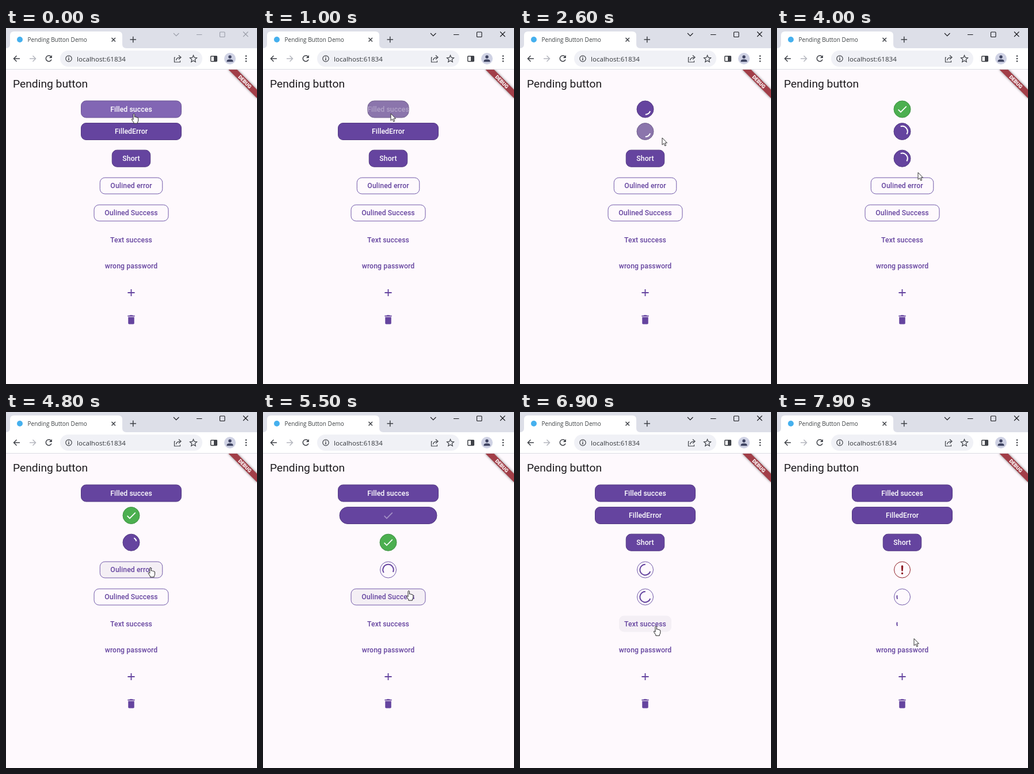
Recreate the animation shown at these times as an HTML page. Size 436 px wide and 616 px high, loop 8000 ms.

```html
<!DOCTYPE html>
<html lang="en">
<head>
<meta charset="utf-8">
<title>Pending Button Demo</title>
<style>
  html, body { margin: 0; width: 100%; height: 100%; overflow: hidden; background: #fef9fd; }
  svg { display: block; width: 436px; height: 616px; }
  .ui { font-family: "Open Sans", "Noto Sans", sans-serif; }
  .app { font-family: Roboto, sans-serif; }
  .label { font: 500 12.25px Roboto, sans-serif; letter-spacing: .09px; text-anchor: middle; }
  .line { fill: none; stroke: #3f4248; stroke-width: 1.5; }
</style>
</head>
<body>
<svg id="stage" viewBox="0 0 436 616">
  <defs>
    <filter id="blur" x="-20%" y="-60%" width="140%" height="220%"><feGaussianBlur stdDeviation="2"/></filter>
    <clipPath id="page"><rect y="72" width="436" height="544"/></clipPath>
  </defs>
  <rect width="436" height="616" fill="#fef9fd"/>

  <!-- browser window -->
  <rect width="436" height="36" fill="#dddfe8"/>
  <path d="M0 35q7 0 7-7V13q0-7 7-7H195q7 0 7 7v15q0 7 7 7H436V72H0z" fill="#fff"/>
  <rect y="71" width="436" height="1" fill="#dcdde4"/>
  <circle cx="24" cy="20" r="5" fill="#45b0ee"/>
  <text class="ui" x="37.5" y="23.7" font-size="10" fill="#3c4043">Pending Button Demo</text>
  <path class="line" d="M183.500 17l6.500 6.500m0-6.500l-6.500 6.500M215.500 20h10.500m-5.250-5.250v10.500"/>
  <g id="controls" fill="none" stroke-width="1.100">
    <path d="M291 9l4.700 4.700L300.400 9M331 11.500h9.500M412 6.500l8.500 8.500m0-8.500l-8.500 8.500"/>
    <rect x="371.500" y="7" width="8.500" height="8.500" rx="1"/>
  </g>
  <rect x="94" y="39" width="247" height="28" rx="14" fill="#f0f1f6"/>
  <path class="line" d="M24 53H13.500m5-5l-5 5l5 5"/>
  <path class="line" d="M41 53h10.500m-5-5l5 5l-5 5" style="stroke:#b5b7bf"/>
  <path class="line" d="M78.500 50A5 5 0 1 0 79 54.500"/>
  <path d="M79.800 47v5h-5z" fill="#3f4248"/>
  <circle class="line" cx="109" cy="53" r="5.200" style="stroke-width:1.200"/>
  <path class="line" d="M109 52v4M109 49.700v1.300"/>
  <text class="ui" x="123" y="57.500" font-size="11.600" fill="#33363b">localhost:61834</text>
  <path class="line" d="M294 51h-1.500v8h10v-2.500M295.500 56q.5-5 7-5.200M300 47.300l4 3.500l-4 3.500" style="stroke-width:1.200"/>
  <path class="line" d="M325.500 47.200l1.700 4l4.300.4l-3.250 2.850l1 4.200l-3.750-2.250l-3.750 2.250l1-4.200l-3.250-2.850l4.300-.4z" style="stroke-width:1.200"/>
  <rect class="line" x="355.700" y="48.700" width="10.600" height="9" rx="1"/>
  <rect x="361" y="48.500" width="5.500" height="9.500" fill="#3f4248"/>
  <circle cx="389" cy="53" r="10" fill="#cfd2e4"/>
  <circle cx="389" cy="50" r="2.700" fill="#3d4260"/>
  <path d="M383.500 58.500v-1.200q0-3 5.500-3t5.500 3v1.200z" fill="#3d4260"/>
  <g fill="#3f4248"><circle cx="417" cy="48.500" r="1.300"/><circle cx="417" cy="53" r="1.300"/><circle cx="417" cy="57.500" r="1.300"/></g>

  <!-- page -->
  <text class="app" x="12" y="103" font-size="19.250" fill="#1d1b1e">Pending button</text>
  <g clip-path="url(#page)">
    <g transform="translate(436 72) rotate(45)">
      <rect x="-35" y="24.500" width="70" height="10.500" fill="#000" opacity=".5" filter="url(#blur)"/>
      <rect x="-35" y="24.500" width="70" height="10.500" fill="#a23e48"/>
      <text class="app" y="32.900" font-size="8.900" font-weight="900" text-anchor="middle" fill="#fff">DEBUG</text>
    </g>
  </g>
  <g id="buttons"></g>
  <g fill="#65449f">
    <path d="M211.400 457.100h12.200v1.800h-12.200zM216.600 451.900h1.800v12.200h-1.800z"/>
    <path transform="translate(207 494) scale(.875)" d="M6 19c0 1.100.9 2 2 2h8c1.100 0 2-.9 2-2V7H6zM19 4h-3.500l-1-1h-5l-1 1H5v2h14z"/>
  </g>
  <path id="cursor" stroke-width="1" stroke-linejoin="round"/>
</svg>
<script>
const LOOP = 8000, CX = 217.5;
const PURPLE = [101, 68, 159], PAPER = [254, 249, 253], GREEN = [76, 175, 80],
      RED = [143, 28, 36], PRESSED = [139, 117, 172], TINT = [244, 239, 245];
const LOAD = 2250, RESTORE = 3250;

// kind, label, centre y, width, height, click time, hover colour
const buttons = [
  ['filled', 'Filled succes', 140.5, 175, 30, 900, [130, 102, 180]],
  ['filled', 'FilledError', 179, 175, 30, 2050, [122, 92, 174]],
  ['filled', 'Short', 225.7, 67.5, 30, 3050, [122, 92, 174]],
  ['outlined', 'Oulined error', 273, 109.5, 29, 4850, TINT],
  ['outlined', 'Oulined Success', 320, 130, 29, 6200, TINT],
  ['text', 'Text success', 366.5, 91, 28, 7200, TINT],
  ['text', 'wrong password', 412, 111, 28, 1e6, TINT],
].map(([kind, label, y, w, h, click, hover]) => ({ kind, label, y, w, h, click, hover }));

// time, x, y of the pointer tip
const track = [
  [0, 222, 148], [1150, 222, 148], [1600, 305, 170], [1900, 262, 181], [2150, 258, 182],
  [2600, 247, 190], [2950, 236, 222], [3350, 237, 226], [4000, 245, 250], [4400, 250, 268],
  [5000, 251, 269], [5500, 253, 309], [6350, 253, 310], [6900, 236, 370], [7350, 236, 371], [7900, 238, 392],
];
const ARROW = ['M0 0V12.200L2.800 9.600L4.800 14L6.700 13.200L4.800 8.900H8.500Z', '#fff', '#333'];
const HAND = ['M-1 1.200Q.2-.6 1.400 1.200V6.200Q2.800 5 3.800 6.600Q5.200 5.600 6 7.200Q7.600 6.600 7.800 8.400V12Q7.600 14 6.400 15.200V17H-.2V15.500L-3.400 10.800Q-3.900 8.800-2.200 9.200L-1 10.500Z', '#fff', '#222'];

const $ = id => document.getElementById(id);
const clamp = v => Math.min(1, Math.max(0, v));
const ramp = (t, a, b) => clamp((t - a) / (b - a));
const lerp = (a, b, k) => a + (b - a) * k;
const mix = (a, b, k) => a.map((v, i) => lerp(v, b[i], k));
const css = c => `rgb(${c.map(Math.round)})`;
const easeOut = k => 1 - (1 - k) ** 3;

// cubic-bezier(.4, 0, .2, 1)
function fastOutSlowIn(x) {
  let lo = 0, hi = 1, s = 0.5;
  for (let i = 0; i < 20; i++) {
    s = (lo + hi) / 2;
    const px = 1.2 * (1 - s) ** 2 * s + 0.6 * (1 - s) * s * s + s ** 3;
    if (px < x) lo = s; else hi = s;
  }
  return 3 * (1 - s) * s * s + s ** 3;
}

function add(parent, tag, attrs = {}) {
  const el = document.createElementNS('http://www.w3.org/2000/svg', tag);
  parent.append(el);
  return set(el, attrs);
}
function set(el, attrs) {
  for (const k in attrs) el.setAttribute(k, attrs[k]);
  return el;
}

for (const b of buttons) {
  const g = add($('buttons'), 'g', { transform: `translate(${CX} ${b.y})` });
  const ink = b.kind === 'filled' ? '#fff' : css(PURPLE);
  b.failed = b.label === 'Oulined error';
  b.box = add(g, 'rect');
  b.text = add(g, 'text', { class: 'label', y: 4.3, fill: ink });
  b.text.textContent = b.label;
  b.arc = add(g, 'path', { fill: 'none', stroke: ink, 'stroke-width': 2 });
  b.icon = add(g, 'path', {
    transform: 'scale(.875) translate(-12 -12)',
    fill: b.failed ? css(RED) : ink,
    d: b.failed ? 'M12 3q2 0 2 2l-.5 8q-.2 2-1.500 2t-1.500-2L10 5q0-2 2-2zM10 19a2 2 0 1 0 4 0a2 2 0 1 0-4 0z'
                : 'M9 16.200L4.800 12l-1.400 1.400L9 19L21 7l-1.400-1.400z',
  });
}

function spinner(t) {
  const T = t + 235, p = T / 1333 % 1;
  const head = fastOutSlowIn(clamp(p * 2)), tail = fastOutSlowIn(clamp(p * 2 - 1));
  const a = Math.PI * (-0.5 + 1.5 * tail + 2 * T / 2222 + 0.5 * p);
  const sweep = Math.max(1.5 * Math.PI * (head - tail), 0.01), r = 9.2;
  const at = q => `${r * Math.cos(q)} ${r * Math.sin(q)}`;
  return `M${at(a)}A${r} ${r} 0 ${+(sweep > Math.PI)} 1 ${at(a + sweep)}`;
}

function pointer(t) {
  const i = track.findLastIndex(p => p[0] <= t);
  const a = track[i], b = track[i + 1] || a;
  const k = ramp(t, a[0], b[0] + (a === b)), s = k * k * (3 - 2 * k);
  return [lerp(a[1], b[1], s), lerp(a[2], b[2], s)];
}

function drawButton(b, t, hovered, arc) {
  const e = t - b.click;
  const shrunk = easeOut(ramp(e, 0, 300)) - easeOut(ramp(e, RESTORE, RESTORE + 300));
  const done = ramp(e, LOAD, LOAD + 150) - ramp(e, RESTORE, RESTORE + 150);
  const round = ramp(e, 0, 200) - ramp(e, RESTORE + 180, RESTORE + 400);
  const w = lerp(b.w, b.h, shrunk);
  let fill = hovered ? b.hover : PAPER, stroke = 'none';

  if (b.kind === 'filled') {
    const lit = e > 0 ? 1 - ramp(e, 550, 680) : 0;
    fill = mix(hovered ? b.hover : mix(PURPLE, PRESSED, lit), GREEN, done);
    stroke = css(mix(fill, [0, 0, 0], 0.18));
  } else if (b.kind === 'outlined') {
    stroke = css(mix([112, 88, 168], b.failed ? RED : GREEN, done));
  }
  const inset = stroke === 'none' ? 0 : 1;
  set(b.box, {
    x: (inset - w) / 2, y: (inset - b.h) / 2, width: w - inset, height: b.h - inset,
    rx: lerp(8.5, (b.h - inset) / 2, round), fill: css(fill), stroke,
    opacity: b.kind === 'text' && !hovered ? 0 : 1,
  });
  set(b.text, { opacity: 1 - ramp(e, 0, 150) + ramp(e, RESTORE + 250, RESTORE + 450) });
  set(b.arc, { d: arc, opacity: ramp(e, 120, 300) - ramp(e, LOAD, LOAD + 120) });
  set(b.icon, { opacity: ramp(e, LOAD + 50, LOAD + 200) - ramp(e, RESTORE, RESTORE + 340) });
}

function draw(t) {
  const [x, y] = pointer(t), arc = spinner(t);
  let over = false;
  for (const b of buttons) {
    const idle = t < b.click || t > b.click + RESTORE + 300;
    const hovered = idle && Math.abs(x - CX) <= b.w / 2 + 0.5 && Math.abs(y - b.y) <= b.h / 2;
    over ||= hovered;
    drawButton(b, t, hovered, arc);
  }
  const [d, fill, stroke] = over ? HAND : ARROW;
  set($('cursor'), { d, fill, stroke, transform: `translate(${x} ${y})` });
  set($('controls'), { stroke: t < 800 ? '#9a9da8' : '#17181c' });
}

function frame(now) {
  draw(now % LOOP);
  requestAnimationFrame(frame);
}
draw(0);
requestAnimationFrame(frame);
</script>
</body>
</html>
```
